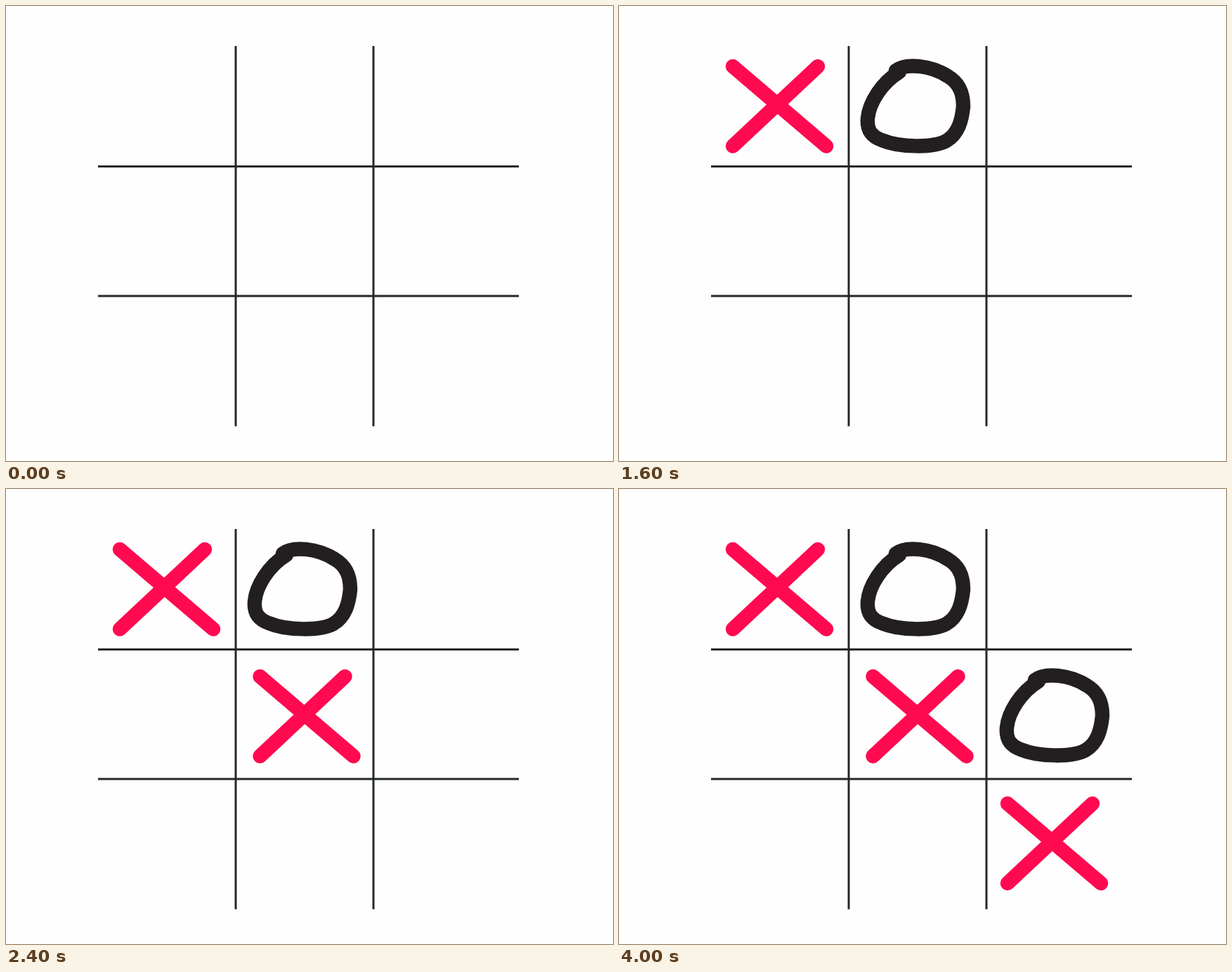
An HTML page for the animation above (4.8 s loop, 864 px wide and 648 px high).

```html
<!DOCTYPE html>
<html lang="en">
<head>
<meta charset="utf-8">
<title>Noughts and crosses</title>
<style>
  html, body { margin: 0; width: 100%; height: 100%; overflow: hidden; background: #fefefe; }
  svg { display: block; width: 864px; height: 648px; }
  path { fill: none; stroke: #231f20; stroke-width: 20.5; stroke-linecap: round; stroke-linejoin: round; }
  #grid { stroke: #25282a; stroke-width: 3; stroke-linecap: butt; }
  #cross { stroke: #ff0a50; }
  .move { visibility: hidden; }
</style>
</head>
<body>
<svg viewBox="0 0 864 648">
  <defs>
    <path id="cross" d="M162 86L295 199.5M283 86L162 199.5"/>
    <path id="nought" d="M394 92C408 81 443 84 468 100C487 111 490 128 490 143C488 163 483 182 466 192C448 202 400 202 374 191C355 184 353 172 354 160C356 138 374 109 399 94"/>
  </defs>
  <path id="grid" d="M327 57V598.500M523 57V598.500M131 228.500H730M131 413H730"/>
  <use class="move" href="#cross"/>
  <use class="move" href="#nought"/>
  <use class="move" href="#cross" x="199.500" y="181"/>
  <use class="move" href="#nought" x="198" y="180"/>
  <use class="move" href="#cross" x="391" y="362"/>
</svg>
<script>
  const STEP = 800;
  const moves = document.querySelectorAll('.move');

  function draw() {
    const played = Math.floor(performance.now() / STEP) % (moves.length + 1);
    moves.forEach((move, i) => {
      move.style.visibility = i < played ? 'visible' : 'hidden';
    });
    requestAnimationFrame(draw);
  }
  draw();
</script>
</body>
</html>
```
